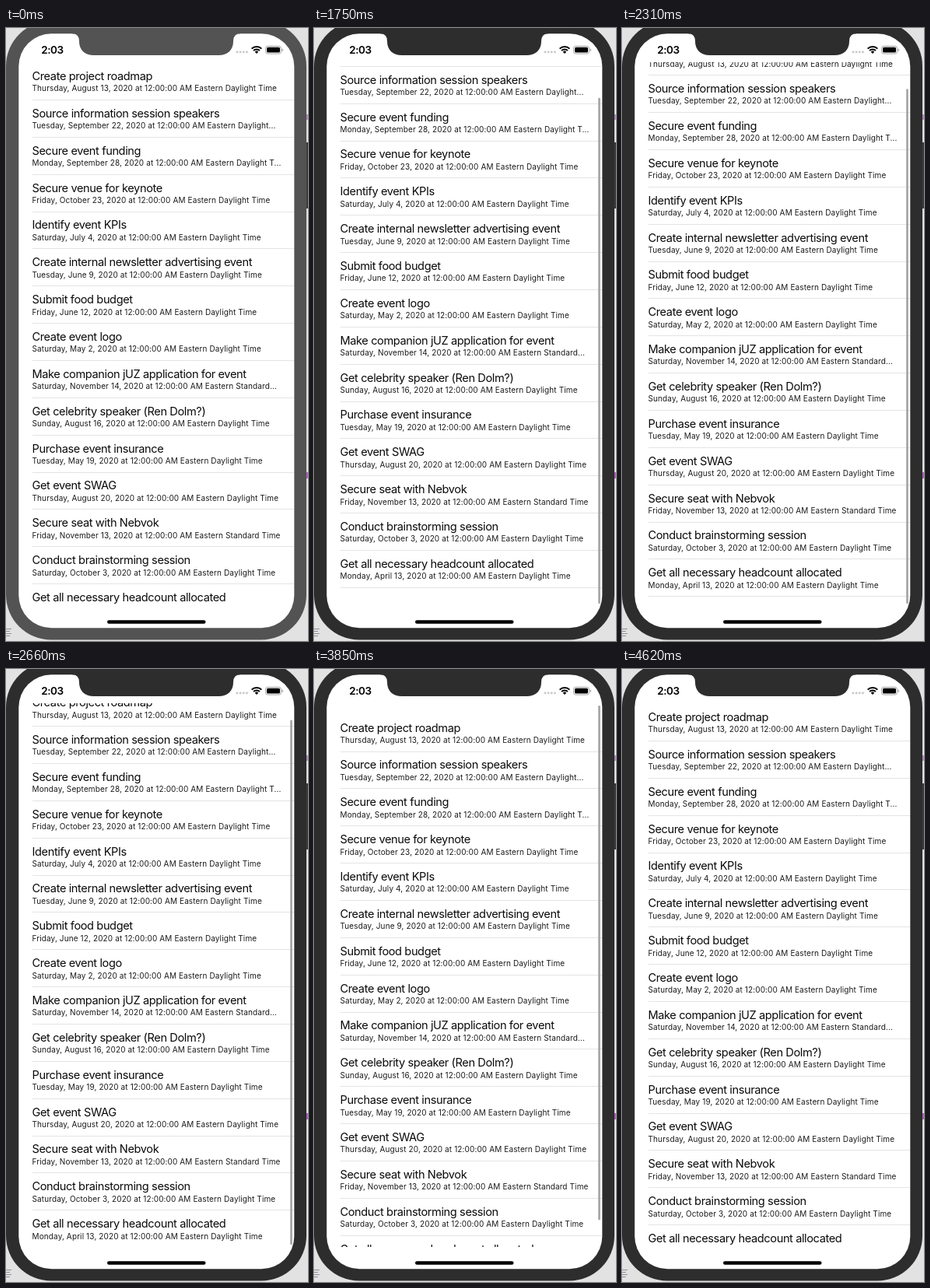
An HTML page with a canvas for the animation above (5.11 s loop, 388 px wide and 788 px high).

```html
<!DOCTYPE html>
<html lang="en">
<head>
<meta charset="utf-8">
<title>Event task list</title>
<style>
html, body { margin: 0; width: 100%; height: 100%; overflow: hidden; background: #e2e2e2; }
canvas { display: block; width: 388px; height: 788px; }
</style>
</head>
<body>
<canvas id="stage"></canvas>
<script>
const W = 388, H = 788, LOOP = 5110, STEP = 70;
const ROW = 47.86, LIST_TOP = 44, LIST_BOTTOM = 743, MAX_SCROLL = 18;
const FONT = 'Inter, Roboto, sans-serif';

const canvas = document.getElementById('stage');
const ctx = canvas.getContext('2d');
const ratio = window.devicePixelRatio || 1;
canvas.width = W * ratio;
canvas.height = H * ratio;

const EDT = 'Eastern Daylight Time';
const tasks = [
  ['Create project roadmap', 'Thursday, August 13', EDT],
  ['Source information session speakers', 'Tuesday, September 22', 'Eastern Daylight...'],
  ['Secure event funding', 'Monday, September 28', 'Eastern Daylight T...'],
  ['Secure venue for keynote', 'Friday, October 23', EDT],
  ['Identify event KPIs', 'Saturday, July 4', EDT],
  ['Create internal newsletter advertising event', 'Tuesday, June 9', EDT],
  ['Submit food budget', 'Friday, June 12', EDT],
  ['Create event logo', 'Saturday, May 2', EDT],
  ['Make companion jUZ application for event', 'Saturday, November 14', 'Eastern Standard...'],
  ['Get celebrity speaker (Ren Dolm?)', 'Sunday, August 16', EDT],
  ['Purchase event insurance', 'Tuesday, May 19', EDT],
  ['Get event SWAG', 'Thursday, August 20', EDT],
  ['Secure seat with Nebvok', 'Friday, November 13', 'Eastern Standard Time'],
  ['Conduct brainstorming session', 'Saturday, October 3', EDT],
  ['Get all necessary headcount allocated', 'Monday, April 13', EDT]
];

const clamp = (v, lo, hi) => Math.min(hi, Math.max(lo, v));

function drag(t, start, end, from, to) {
  const p = clamp((t - start) / (end - start), 0, 1);
  return from + (to - from) * (1 - (1 - p) ** 2);
}

// Critically damped return after an overscroll
function spring(t, release, rest, excess) {
  const k = (t - release) / 100;
  return rest + excess * (1 + k) * Math.exp(-k);
}

function scrollAt(t) {
  if (t < 1610) return 0;
  if (t < 2060) return drag(t, 1540, 2050, 0, 66);
  if (t < 2800) return spring(t, 2060, MAX_SCROLL, 48);
  if (t < 3570) return MAX_SCROLL;
  if (t < 3955) return drag(t, 3475, 3850, MAX_SCROLL, -13.6);
  if (t < 4550) return spring(t, 3955, 0, -13.6);
  return 0;
}

function barAlpha(t) {
  const fade = (start, end) => t < start ? 0 : clamp((end - t) / 140, 0, 1);
  return Math.max(fade(1610, 2940), fade(3570, 4620));
}

function rounded(x, y, w, h, r, fill) {
  ctx.fillStyle = fill;
  ctx.beginPath();
  ctx.roundRect(x, y, w, h, r);
  ctx.fill();
}

function rect(x, y, w, h, fill) {
  ctx.fillStyle = fill;
  ctx.fillRect(x, y, w, h);
}

function text(str, x, y, size, spacing, weight, fill) {
  ctx.font = `${weight} ${size}px ${FONT}`;
  ctx.letterSpacing = spacing + 'px';
  ctx.fillStyle = fill;
  ctx.fillText(str, x, y);
}

function drawDesktop() {
  rect(0, 0, W, H, '#e2e2e2');
  rect(385, 147, 3, 85, '#3c3c3c');
  rect(386, 111, 2, 7, '#b58cc0');
  rect(386, 571, 2, 8, '#a766b5');
  for (let i = 0; i < 4; i++) rect(0, 772 + i * 3, 7 - i % 2 * 2, 1, '#8a8f9c');
}

function drawPhone(shell) {
  rounded(0, -9, 386, 795.5, 58, shell);
  rounded(16.3, 7.2, 354, 764, 42, '#fff');
}

function drawNotch(shell) {
  ctx.fillStyle = shell;
  ctx.beginPath();
  ctx.moveTo(85, 6);
  ctx.lineTo(85, 7.2);
  ctx.quadraticCurveTo(94, 7.2, 94, 17);
  ctx.bezierCurveTo(94, 28, 101, 35, 113, 35);
  ctx.lineTo(273, 35);
  ctx.bezierCurveTo(285, 35, 292, 28, 292, 17);
  ctx.quadraticCurveTo(292, 7.2, 301, 7.2);
  ctx.lineTo(301, 6);
  ctx.fill();
}

function drawList(scroll) {
  ctx.save();
  ctx.beginPath();
  ctx.rect(17, LIST_TOP, 353, LIST_BOTTOM - LIST_TOP);
  ctx.clip();
  tasks.forEach(([title, date, zone], i) => {
    const y = i * ROW - scroll;
    text(title, 33.5, y + 67, 14.6, -0.4, 400, '#0a0a0a');
    text(`${date}, 2020 at 12:00:00 AM ${zone}`, 33.5, y + 81.4, 10, 0.12, 400, '#1a1a1a');
    rect(34, Math.round(y + 92), 336, 1, '#e4e4e4');
  });
  ctx.restore();
}

function drawBar(scroll, alpha) {
  if (!alpha) return;
  const inside = clamp(scroll, 0, MAX_SCROLL);
  const over = scroll - inside;
  const top = 47 + inside * 0.975 + Math.max(0, over);
  const bottom = 722 + inside + Math.min(0, over);
  ctx.globalAlpha = alpha;
  rounded(365.2, top, 2.6, bottom - top, 1.3, '#a2a2a2');
  ctx.globalAlpha = 1;
}

function drawWifi(x, y) {
  ctx.strokeStyle = '#000';
  ctx.lineWidth = 2;
  for (const r of [9, 5.6]) {
    ctx.beginPath();
    ctx.arc(x, y, r, -Math.PI * 0.75, -Math.PI * 0.25);
    ctx.stroke();
  }
  ctx.fillStyle = '#000';
  ctx.beginPath();
  ctx.moveTo(x, y);
  ctx.arc(x, y, 3.2, -Math.PI * 0.75, -Math.PI * 0.25);
  ctx.fill();
}

function drawStatus() {
  text('2:03', 45.3, 33, 13.5, -0.5, 600, '#000');
  for (let i = 0; i < 4; i++) rounded(295.5 + i * 4.2, 29.5, 2.8, 2.8, 1, '#c9c9c9');
  drawWifi(322, 33);
  ctx.strokeStyle = '#a5a5a5';
  ctx.lineWidth = 1;
  ctx.beginPath();
  ctx.roundRect(333.5, 23.3, 20, 9.8, 2.8);
  ctx.stroke();
  rounded(335, 24.8, 17, 6.8, 1.5, '#000');
  rounded(354.7, 26.6, 1.3, 3.4, 0.7, '#a5a5a5');
}

function draw(t) {
  const shell = t < 1400 ? '#535353' : '#2d2d2d';
  const scroll = scrollAt(t);
  ctx.setTransform(ratio, 0, 0, ratio, 0, 0);
  drawDesktop();
  drawPhone(shell);
  drawList(scroll);
  drawBar(scroll, barAlpha(t));
  drawNotch(shell);
  drawStatus();
  rounded(130, 761.2, 126.5, 4.5, 2.25, '#000');
}

const begin = performance.now();
function tick() {
  const t = (performance.now() - begin) % LOOP;
  draw(Math.floor(t / STEP) * STEP);
  requestAnimationFrame(tick);
}
tick();
</script>
</body>
</html>
```
